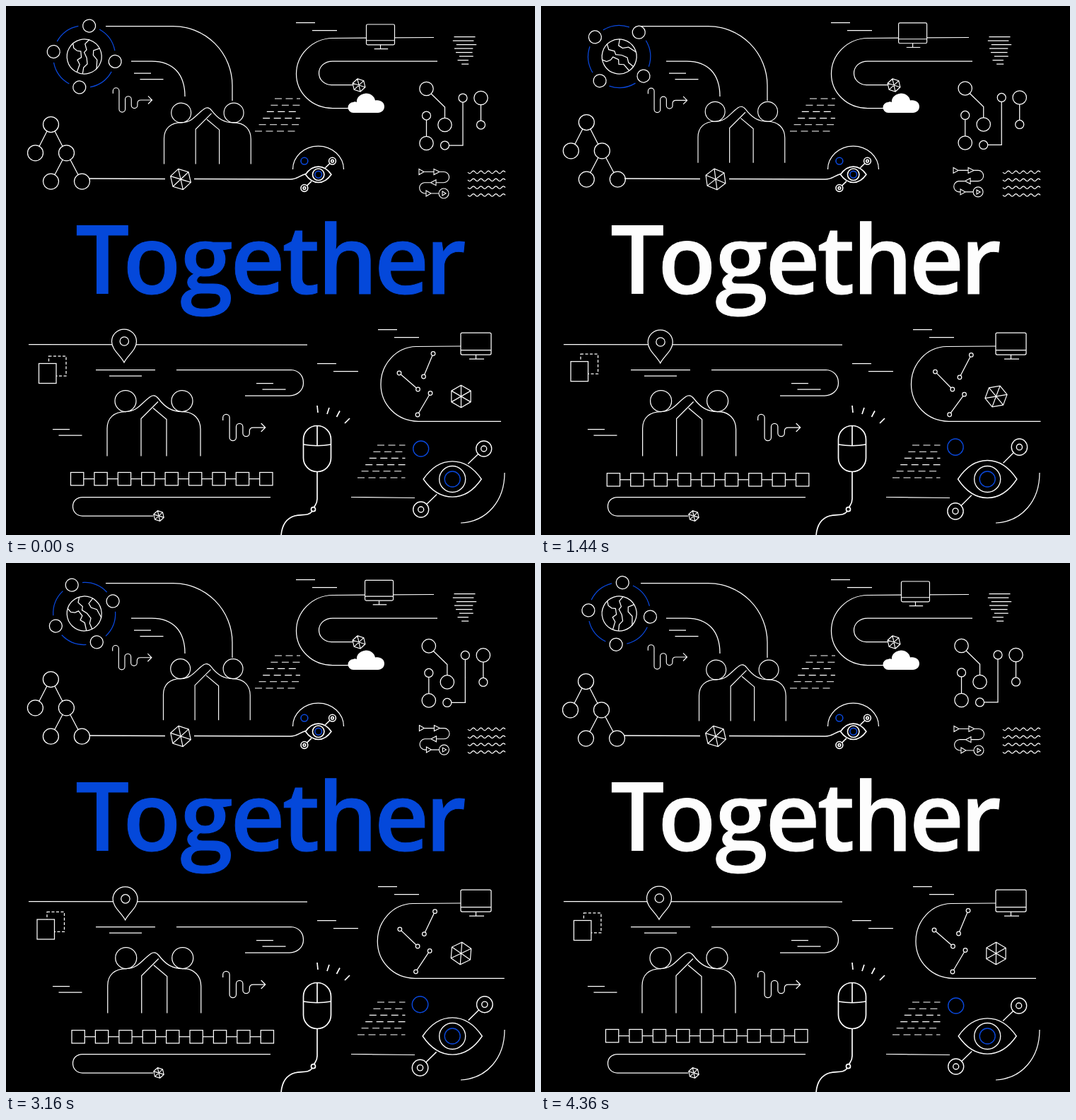
An HTML page that plays this animation: 748 by 748 pixels, repeating every 4.4 s.

```html
<!DOCTYPE html>
<html lang="en">
<head>
<meta charset="utf-8">
<title>Together</title>
<style>
  html, body { margin: 0; width: 100%; height: 100%; overflow: hidden; background: #000; }
  svg { display: block; width: 100vw; height: 100vh; fill: none; stroke: #fff; stroke-width: 1.25; }
  .blue { stroke: #0a48dc; }
  .mask { fill: #000; }
  .bold { stroke-width: 1.7; }
  #word { font: 600 134px "Open Sans", "Noto Sans", sans-serif; text-anchor: middle; stroke-width: 1; }
</style>
</head>
<body>
<svg id="stage" viewBox="0 0 748 748" xmlns="http://www.w3.org/2000/svg">
  <defs>
    <path id="squiggle" d="M0 9V5A4.7 4.7 0 0 1 9.4 5V33A4.7 4.7 0 0 0 18.8 33V18A4.7 4.7 0 0 1 28.2 18V27A4.7 4.7 0 0 0 37.6 27V24Q37.6 19 43 19H60M54 13L60 19L54 25"/>
    <g id="pair">
      <circle r="15"/><circle cx="80" r="15"/>
      <path d="M-26 78V39C-26 24 -16 15 0 15C17 15 21 4 35 -6Q41 -10 46 -4C56 9 65 15 80 15C97 15 106 26 106 40V78M22 78V25L46 1M39 10L58 26V78"/>
    </g>
    <path id="gem" d="M0 -15L13 -7.5V7.5L0 15L-13 7.5V-7.5ZM0 -15V15M13 -7.5L-13 7.5M13 7.5L-13 -7.5"/>
    <g id="screen">
      <rect class="mask" width="43" height="31" rx="2"/>
      <path d="M0 24.5H43M21.5 31V37M12 37.2H33"/>
    </g>
    <g id="nodes">
      <path d="M-37 36L-22 21.5M37 -36L22 -21.5"/>
      <circle cx="44.5" cy="-43" r="11"/><circle cx="44.5" cy="-43" r="4"/>
      <circle cx="-44.5" cy="43" r="11"/><circle cx="-44.5" cy="43" r="4"/>
      <circle class="blue" cx="-44.5" cy="-43" r="11"/>
      <path d="M-41 0C-18 -33.5 18 -33.5 41 0C18 33.5 -18 33.5 -41 0Z"/>
    </g>
    <g id="pupil"><circle r="18.5"/><circle class="blue" r="11"/></g>
  </defs>

  <!-- connecting lines -->
  <path d="M141 28.5H236A84 84 0 0 1 320 112V134M177 78H206C236 78 253 96 253 128"/>
  <path d="M605 44.5L462 45.5C432 46 410.5 70 410.5 96C410.5 122 432 144.5 462 144.5H486M610 78H462C450 78 442.5 86 442.5 95C442.5 104 450 111.5 460 111.5H490"/>
  <path stroke-width="1.4" d="M118 244L225 244.5M266 244.5L402 245C412 245 414 240 425 237"/>
  <path d="M405.5 231A36 33 0 0 1 477.5 231"/>
  <path d="M32 478.5L426 479M127 514.5H211M146 523H192"/>
  <path d="M241 514.5H403C414 515 420.5 523 420.5 533C420.5 543 412 551 401 551H338"/>
  <path d="M374 694.5H108C100 694.5 94.5 700 94.5 707.5S100 721 108 721H208M488 694.5L578 695.5M705 660C705 700 680 729 643 731"/>
  <path id="streaks"/>
  <path id="dashes" stroke-width="1.1"/>
  <path id="waves"/>

  <g id="globe">
    <circle r="24.5"/>
    <path d="M-23 -8L-19 -3L-13 -2L-8 -4L-3 3L-6 9L0 13L2 24M-6 -24L-8 -16L-2 -10L-3 -5L4 0L9 7L7 14L10 22M13 -21L7 -14L10 -8L18 -5L24 7"/>
    <g id="orbit" transform="rotate(-21)"></g>
  </g>

  <g id="arrow"><use href="#squiggle" transform="translate(151.3 115.5) scale(.92)"/></g>
  <use href="#squiggle" x="306.7" y="577"/>
  <g id="pairTop"><use href="#pair" transform="translate(247.7 151) scale(.93)"/></g>
  <g id="pairLow"><use href="#pair" x="169" y="558.5"/></g>

  <g id="tree">
    <path d="M58 177L47 198.5M69 177L80 198.5M80 217.5L69 238.5M91 217.5L102 238.5"/>
  </g>

  <g id="monitor"><use href="#screen" transform="translate(509.5 26) scale(.93)"/></g>
  <path fill="#fff" stroke="none" d="M491 151A7.5 7.5 0 0 1 491 136Q493 134.5 496 136C495 130 501 124 509 123.5C516 123.5 521 128 522 133.5C529 132 535 136 535 142C535 147.5 531 151 526 151Z"/>

  <g id="circuit">
    <path d="M601 124L620.5 143V158.5M594.5 161V184.5M626.5 197H646V136M671.5 139.5V162"/>
  </g>

  <g id="flow" stroke-width="1.1">
    <path d="M584 230.5L591 234.5L584 238.5ZM591 234.5H605M605 230.5L613 234.5L605 238.5ZM613 234.5H619A7.6 7.6 0 0 1 619 249.7H608M608 245.7L600.5 249.7L608 253.7ZM600.5 249.7H591.5A7.7 7.7 0 0 0 591.5 265H594M594 261L601 265L594 269ZM601 265H612M617 262L622 265L617 268Z"/>
    <circle cx="619" cy="265" r="7"/>
  </g>

  <g stroke-width="3.6" transform="translate(441.7 238.3) scale(.445)">
    <use href="#nodes"/><use href="#pupil"/>
  </g>

  <text id="word" x="136.5 206.5 283.5 356 417 483 559.5 622" y="407">Together</text>

  <g id="pin">
    <path class="mask" d="M167 504C162 494 149.5 486 149.5 474.5A17.5 17.5 0 0 1 184.5 474.5C184.5 486 172 494 167 504Z"/>
    <circle cx="167.3" cy="474" r="6.2"/>
  </g>
  <g id="sheets">
    <rect x="60.5" y="495" width="24.5" height="28" stroke-dasharray="4 2.5"/>
    <rect class="mask" x="46.5" y="505.5" width="24.5" height="28"/>
  </g>
  <g id="chain"></g>

  <path id="bend"/>
  <use href="#screen" x="643" y="462"/>
  <g id="links"></g>

  <g class="bold">
    <rect x="420.5" y="593.5" width="39" height="65" rx="19.5"/>
    <path d="M420.5 620Q440 623.5 459.5 620M440 593.5V621.5M440 658.5V697C440 704 437 706 435.5 709M433 714.5C427 722 418 718 408 721C395 725 390 735 389 749"/>
    <circle cx="434.5" cy="711.7" r="3"/>
    <path d="M440 565L441 575M457 568L454 577M472 572.5L467.5 581M486 583L479 590"/>
  </g>

  <g stroke-width="1.35" transform="translate(631.2 669)">
    <g id="eye"><use href="#nodes"/></g>
    <use href="#pupil"/>
  </g>
</svg>

<script>
const LOOP = 4400, STEP = 40;
const $ = id => document.getElementById(id);

function add(parent, tag, attrs) {
  const node = document.createElementNS("http://www.w3.org/2000/svg", tag);
  for (const key in attrs) node.setAttribute(key, attrs[key]);
  return parent.appendChild(node);
}
const circle = (parent, cx, cy, r) => add(parent, "circle", { cx, cy, r });

// Pairs of speed lines, the second one longer and shifted right
const smallStreak = (x, y) => `M${x} ${y}h24m-15.500 8.700h33`.replace(/00\b/g, "");
const largeStreak = (x, y) => `M${x} ${y}h27m-4 11h35`;

function tornado(x, y) {
  let d = "";
  for (let i = 0; i < 8; i++) {
    const width = 30 - 26 * (i / 8) ** 2;
    d += `M${x + 2.5 * Math.sin(4 * i) - width / 2} ${y + 5.5 * i}h${width}`;
  }
  return d;
}
$("streaks").setAttribute("d",
  smallStreak(181, 95) + smallStreak(354, 533.5) + smallStreak(66, 598.5) +
  largeStreak(410, 23.5) + largeStreak(440, 505.5) + largeStreak(526, 457.5) +
  tornado(648.5, 43.5));

function dashRows(x, y, right) {
  let d = "";
  for (let row = 0; row < 6; row++)
    for (let left = x - 5.6 * row; left < right - 3; left += 15.5)
      d += `M${left} ${y + 9.2 * row}H${Math.min(left + 10, right)}`;
  return d;
}
$("dashes").setAttribute("d", dashRows(380, 131, 416) + dashRows(525, 621, 564.5));

let waves = "";
for (let row = 0; row < 4; row++)
  waves += `M653 ${235 + 10.8 * row}` + "q2.65 3.6 5.3 0t5.3 0".repeat(5);
$("waves").setAttribute("d", waves);

for (let q = 0; q < 4; q++) {
  const arm = add($("orbit"), "g", { transform: `rotate(${q * 90})` });
  const s = 44 * Math.sin(Math.PI / 9), c = 44 * Math.cos(Math.PI / 9);
  circle(arm, 0, -44, 9);
  add(arm, "path", { class: "blue", d: `M${s} ${-c}A44 44 0 0 1 ${c} ${-s}` });
}

for (const [col, row] of [[1, 0], [0, 1], [2, 1], [1, 2], [3, 2]])
  circle($("tree"), 41.5 + 22 * col, 167.5 + 40.3 * row, 11);

for (const [x, y] of [[594.5, 117], [620.5, 168], [594.5, 194], [671.5, 130]])
  circle($("circuit"), x, y, 9.7);
for (const [x, y] of [[594.5, 155], [620.5, 197], [646, 130], [671.5, 168]])
  circle($("circuit"), x, y, 6);

for (let i = 0; i < 9; i++) {
  const x = 91.5 + 33.4 * i;
  add($("chain"), "rect", { x, y: 659.5, width: 18.3, height: 18.3 });
  if (i < 8) add($("chain"), "path", { d: `M${x + 18.3} 668.6h15.1` });
}

// A part floats on one slow and one fast swell per loop
const swell = (t, count) => Math.sin(Math.PI * count * t / LOOP) ** 2;
const float = (t, slow, fast) => slow * swell(t, 1) + fast * swell(t, 4);

// Slow x, fast x, slow y, fast y
const drifts = {
  arrow:   [-1.5, 1.8, 1.5, -1],
  pairTop: [-1.6, -.5, -2.3, 0],
  pairLow: [1.4, -.6, 0, 0],
  tree:    [-.7, 2, -5.2, 1.2],
  monitor: [-2.5, -3, -2.8, 0],
  circuit: [5, 2.3, 1.3, -2.2],
  flow:    [1.5, -3, -1, -2],
  pin:     [2.8, -.5, 1.4, 0],
  sheets:  [-3.5, -2.7, -2, -2],
  chain:   [2.5, 0, 2.2, -.6]
};

// One smooth swing out and back within a span of the loop
function swing(t, from, to) {
  const u = ((t - from + LOOP) % LOOP) / (to - from);
  return u < 1 ? Math.sin(Math.PI * u) ** 2 : 0;
}
const globeTurn = t => -23.5 + 36 * swing(t, 4000, 5000) - 28 * swing(t, 600, 2400);

// Place, size, resting angle and sway
const gems = [
  [247, 245, 1, -13, 8],
  [499, 112, .62, -13, 0],
  [216, 721, .5, -13, 0],
  [643.5, 552, 1.05, 0, 30]
].map(([x, y, size, rest, sway]) => ({
  x, y, size, rest, sway,
  node: add($("stage"), "use", { href: "#gem", "stroke-width": 1.2 / size })
}));

// Two ends each, as x, y, reach x, reach y
const links = [
  [[604, 491.5, 4.5, 2], [590.5, 524, 1.5, 1]],
  [[556, 519, 1.5, -2], [582.5, 542, -.7, 0]],
  [[600, 547.5, -1.5, 1.7], [582, 578, -4.5, -.3]]
].map(ends => ({
  ends,
  line: add($("links"), "path", {}),
  dots: ends.map(() => add($("links"), "circle", { r: 2.8, class: "mask" }))
}));

function draw(t) {
  const move = (id, value) => $(id).setAttribute("transform", value);

  for (const id in drifts) {
    const [sx, fx, sy, fy] = drifts[id];
    move(id, `translate(${float(t, sx, fx)} ${float(t, sy, fy)})`);
  }
  move("eye", `scale(${1 + float(t, .05, -.03)} ${1 + float(t, .065, .01)})`);
  move("globe", `translate(110.7 71.5) rotate(${globeTurn(t) + 21})`);

  for (const { node, x, y, size, rest, sway } of gems)
    node.setAttribute("transform", `translate(${x} ${y}) rotate(${rest + float(t, 0, sway)}) scale(${size})`);

  const s = float(t, 7.5, 1.5), left = 530 - s;
  $("bend").setAttribute("d", `M643 481L${left + 50} 481.5C${left + 22} 482 ${left} 506 ${left} 535C${left} 563 ${left + 22} 587 ${left + 53} 587.3H${700 + s}`);

  const reach = float(t, .8, .55);
  for (const { ends, line, dots } of links) {
    const pts = ends.map(([x, y, dx, dy]) => [x + dx * reach, y + dy * reach]);
    line.setAttribute("d", `M${pts[0]}L${pts[1]}`);
    dots.forEach((dot, i) => {
      dot.setAttribute("cx", pts[i][0]);
      dot.setAttribute("cy", pts[i][1]);
    });
  }

  const color = t % 2200 < 1100 ? "#0448da" : "#fdfdfd";
  $("word").setAttribute("fill", color);
  $("word").setAttribute("stroke", color);
}

const start = performance.now();
function tick() {
  const t = (performance.now() - start) % LOOP;
  draw(Math.floor(t / STEP) * STEP);
  requestAnimationFrame(tick);
}
tick();
</script>
</body>
</html>
```
